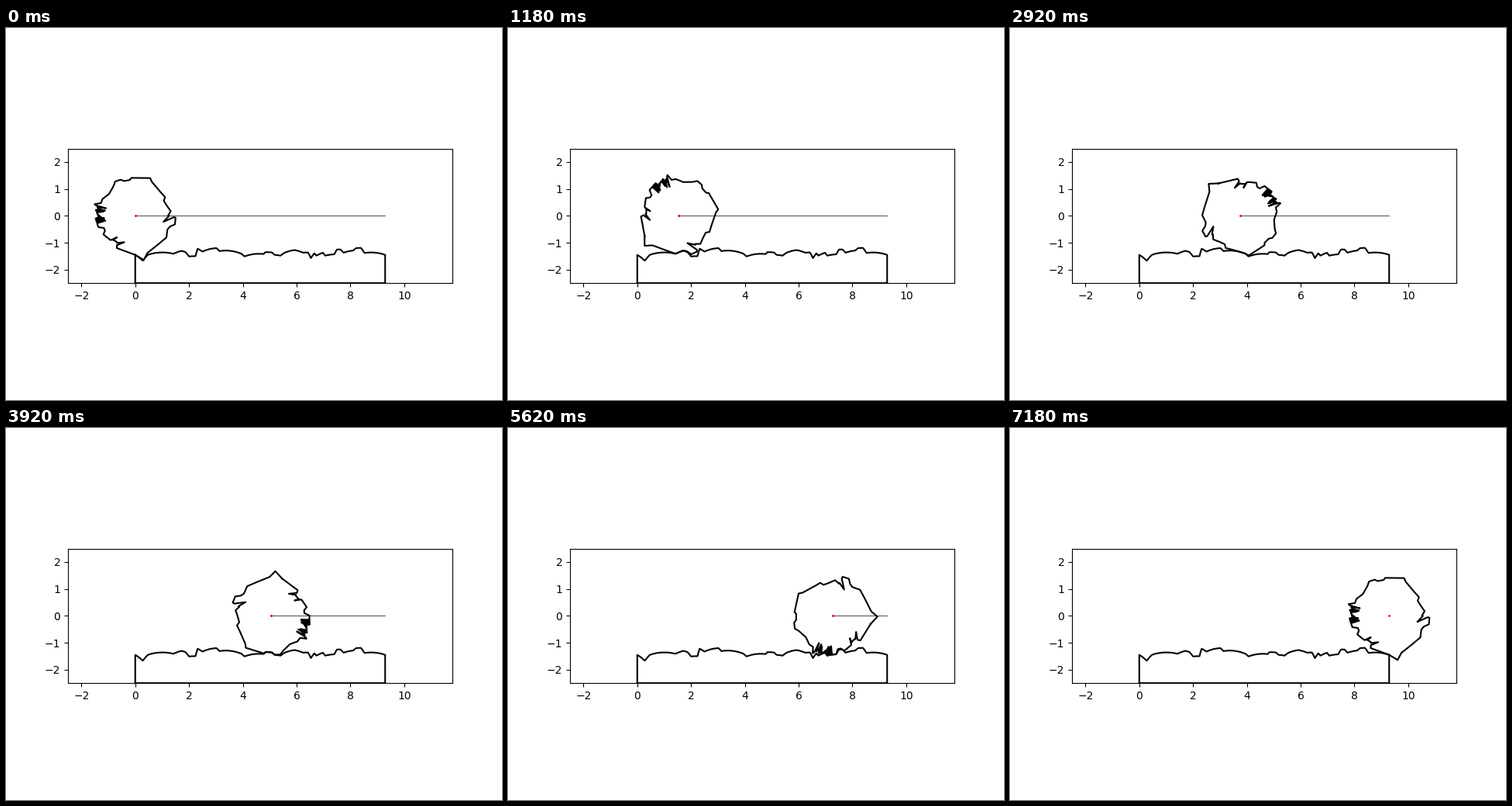
These frames come from a looping animation (640 px wide and 480 px high, 7.2 s). A matplotlib script:

```python
import random

import numpy as np
import matplotlib.pyplot as plt
from matplotlib.animation import FuncAnimation

FRAMES = 360
LENGTH = 9.29            # road covered by one full turn
FLOOR = -2.5

# Key points of the road: distance and depth below the axle
BUMPS = [
    (0, 1.45), (0.28, 1.67), (0.47, 1.45), (1.0, 1.36), (1.42, 1.41),
    (1.72, 1.30), (1.87, 1.35), (2.0, 1.51), (2.24, 1.50), (2.32, 1.22),
    (2.5, 1.33), (2.78, 1.23), (3.02, 1.20), (3.13, 1.31), (3.41, 1.29),
    (3.95, 1.41), (4.06, 1.51), (4.77, 1.42), (4.84, 1.35), (5.08, 1.36),
    (5.18, 1.45), (5.4, 1.48), (5.55, 1.37), (5.92, 1.27), (6.24, 1.37),
    (6.42, 1.36), (6.53, 1.57), (6.66, 1.39), (6.73, 1.48), (6.98, 1.37),
    (7.06, 1.48), (7.4, 1.43), (7.5, 1.25), (7.63, 1.25), (7.74, 1.37),
    (8.1, 1.29), (8.21, 1.20), (8.39, 1.19), (8.52, 1.38), (LENGTH, 1.45),
]


def travel(u):
    return LENGTH * u - 0.03 * np.sin(np.pi * u) ** 2


def polar(deg, r):
    """Point at an angle counterclockwise from straight down."""
    return -1j * r * np.exp(1j * np.radians(deg))


# The wheel's rim is the road wrapped around the axle
dist, depth = np.array(BUMPS).T
turn = dist / LENGTH
turn += 0.03 / LENGTH * np.sin(np.pi * turn) ** 2
rim_deg = 360 * turn
rim = polar(rim_deg, depth)

# Straight rim edges become shallow arcs on the road
steps = np.linspace(0, len(rim) - 1, 10 * len(rim))
edge = np.interp(steps, np.arange(len(rim)), rim)
edge_deg = np.degrees(np.unwrap(np.angle(edge * 1j)))
edge_r = abs(edge)
road_x, road_y = travel(edge_deg / 360), -edge_r

# Barbs cut into the rim: root angle, tip angle, tip radius
rng = random.Random(4)
barbs = [(89, 78, 1.07), (316, 319.5, 1.05), (327, 337.5, 1.06)]
barbs += [(a, a + rng.uniform(-2, 4), rng.uniform(1.1, 1.35))
          for a in range(256, 282, 4)]

outline = list(zip(rim_deg, rim))
for root, tip, r in barbs:
    outline.append((root, polar(tip, r)))
    for side in (root - 1, root + 1):
        outline.append((side, polar(side, np.interp(side, edge_deg, edge_r))))
outline.sort(key=lambda p: p[0])
shape = np.array([z for _, z in outline])

fig, ax = plt.subplots(figsize=(6.4, 4.8), dpi=100)
ax.set_aspect("equal")
ax.set_xlim(-2.5, LENGTH + 2.5)
ax.set_ylim(-2.5, 2.5)

ax.plot(np.r_[0, road_x, LENGTH, 0],
        np.r_[FLOOR, road_y, FLOOR, FLOOR], "k", lw=1.5)
wheel, = ax.plot([], [], "k", lw=1.5)
hub, = ax.plot([], [], "ro", ms=1)
axle, = ax.plot([], [], "k", lw=0.5)


def update(i):
    u = i / (FRAMES - 1)
    x = travel(u)
    turned = shape * np.exp(-2j * np.pi * u)
    wheel.set_data(turned.real + x, turned.imag)
    hub.set_data([x], [0])
    axle.set_data([x, LENGTH], [0, 0])
    return wheel, hub, axle


anim = FuncAnimation(fig, update, frames=FRAMES, interval=20,
                     repeat=True, repeat_delay=0)
plt.show()
```
